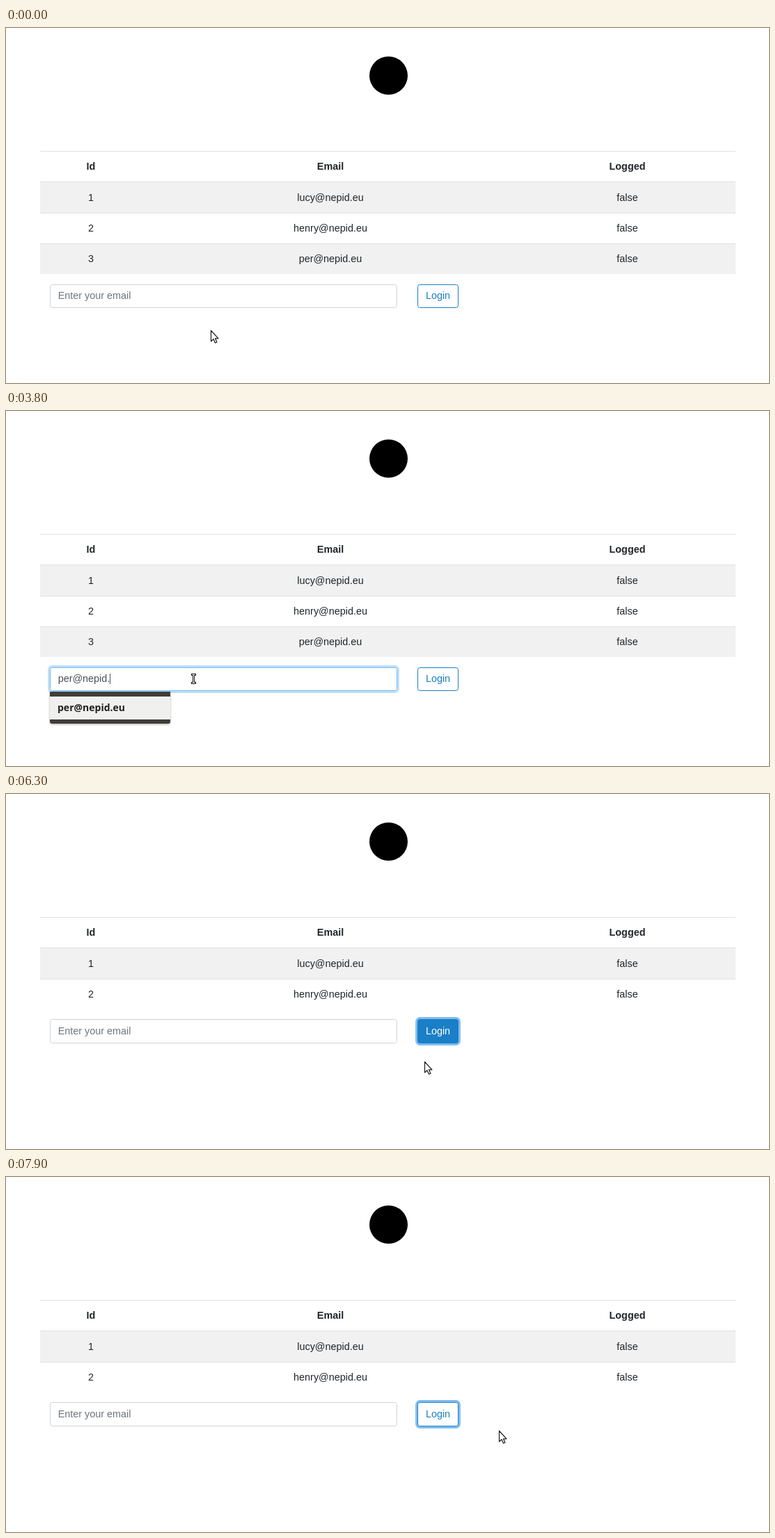
These frames come from a looping animation (1096 px wide and 511 px high, 8 s). An HTML page:

```html
<!DOCTYPE html>
<html lang="en">
<head>
<meta charset="utf-8">
<title>Login demo</title>
<style>
  html, body { margin: 0; width: 100%; height: 100%; overflow: hidden; background: #fff; }
  body { position: relative; font: 14.4px "Liberation Sans", Arial, sans-serif; color: #212529; }
  body * { box-sizing: border-box; }
  .logo, .row, .line, #form, #form > *, #list, #overlay { position: absolute; }
  .logo { left: 522px; top: 41px; width: 55px; height: 55px; border-radius: 50%; background: #000; }

  .row, .line { left: 49px; width: 999px; }
  .row {
    display: grid; grid-template-columns: 146px 542px 311px;
    height: 44px; line-height: 44px; text-align: center;
  }
  .line { height: 1px; background: #dee2e6; }
  .head { font-weight: bold; }

  #form { left: 0; }
  #input, #button {
    top: 0; height: 34.2px; padding: 5.4px 10.8px;
    border: 1px solid; border-radius: 3.6px; line-height: 20px; white-space: pre;
  }
  #input { left: 62.9px; width: 499.5px; }
  #button { left: 591.2px; width: 58.6px; padding: 5.4px 0; text-align: center; border-color: #1a7fc6; }
  #caret { top: 9.4px; width: 1px; height: 15px; background: #495057; }

  #list {
    left: 63px; top: 404px; width: 173px; padding: 7px 0 6px; border-radius: 0 0 3px 3px;
    background: #3f3e38; box-shadow: 0 1px 3px rgba(0, 0, 0, .35);
    font: 600 14px/31px "Noto Sans", "Open Sans", sans-serif; color: #222;
  }
  #list div { height: 33px; padding-left: 11px; }
  #overlay { left: 0; top: 0; width: 1096px; height: 511px; fill: none; }
</style>
</head>
<body>
<div class="logo"></div>
<div id="table"></div>

<div id="form">
  <div id="input"><span id="value"></span></div>
  <div id="caret"></div>
  <div id="button">Login</div>
</div>

<div id="list">
  <div id="otherOption">henry@nepid.eu</div>
  <div id="option">per@nepid.eu</div>
</div>

<svg id="overlay" viewBox="0 0 1096 511">
  <path id="wave" stroke="#e0574f" stroke-width=".9"/>
  <path id="arrow" d="M.5.5V16L4 12.7 6.4 18.3 8.900 17.2 6.5 11.8H11Z" fill="#fff" stroke="#1c1c1c" stroke-width="1.2" stroke-linejoin="round"/>
  <g id="beam" stroke-linecap="square">
    <path d="M-2-6H2M0-6V6M-2 6H2" stroke="#111" stroke-width="3"/>
    <path d="M-2-6H2M0-6V6M-2 6H2" stroke="#fff"/>
  </g>
</svg>
<script>
const LOOP = 8000, STEP = 100;
const EMAIL = "per@nepid.eu";
const TYPED_AT = [1700, 1800, 1900, 2500, 2900, 3000, 3200, 3300, 3500, 3800, 4000, 4300];
const FOCUS = 600, CLICK = 6200, REMOVED = 6300;
const ROW_HEIGHT = 44.2, FORM_TOP = 368.6;

// Pointer path: time, x, y
const PATH = [
  [200, 294, 435], [300, 291, 427], [400, 283, 408], [500, 274, 392], [600, 270, 387],
  [1000, 270, 387], [1100, 269, 385], [5200, 269, 385], [5300, 335, 388], [5500, 490, 397],
  [5600, 543, 398], [5800, 586, 402], [5900, 594, 396], [6100, 601, 385], [7100, 601, 385],
  [7200, 637, 368], [7300, 668, 325], [7400, 684, 288], [7500, 692, 268], [7600, 697, 285],
  [7700, 701, 315], [7800, 705, 345], [7900, 708, 365]
];

const $ = id => document.getElementById(id);
const show = (id, on) => { $(id).style.display = on ? "" : "none"; };
const style = (id, rules) => Object.assign($(id).style, rules);
const ramp = (t, from, to) => Math.max(0, Math.min(1, (t - from) / (to - from)));
const mix = (a, b, k) => `rgb(${a.map((v, i) => Math.round(v + (b[i] - v) * k))})`;

const WHITE = [255, 255, 255], BLUE = [26, 127, 198];

function buildTable() {
  const line = y => `<div class="line" style="top:${y}px"></div>`;
  const row = (y, values, attrs, fill) =>
    `<div ${attrs} style="top:${y}px;background:${fill}">` +
    values.map(v => `<span>${v}</span>`).join("") + "</div>";
  const users = ["lucy@nepid.eu", "henry@nepid.eu", EMAIL].map((email, i) =>
    row(222 + 44 * i, [i + 1, email, "false"], `class="row" id="row${i + 1}"`, i % 2 ? "#fff" : "#f1f1f1"));
  $("table").innerHTML = row(177, ["Id", "Email", "Logged"], 'class="row head"', "#fff") +
    users.join("") + [177, 221, 266].map(line).join("");
  $("row3").style.borderTop = "1px solid #dee2e6";
  $("row3").style.lineHeight = "42px";
}

function pointerAt(t) {
  const next = PATH.findIndex(p => p[0] >= t);
  if (next <= 0) return PATH[0].slice(1);
  const a = PATH[next - 1], b = PATH[next], k = ramp(t, a[0], b[0]);
  return [1, 2].map(i => Math.round(a[i] + (b[i] - a[i]) * k));
}

function drawPointer(t) {
  const [x, y] = pointerAt(t);
  const overInput = t < REMOVED && x > 63 && x < 563 && y > 369 && y < 403;
  show("beam", overInput);
  show("arrow", !overInput);
  $("arrow").setAttribute("transform", `translate(${x} ${y})`);
  $("beam").setAttribute("transform", `translate(${x + .5} ${y + .5})`);
  style("row2", { background: t >= REMOVED && y < 310 ? "#ececec" : "#fff" });
}

function drawInput(t) {
  const focused = t >= FOCUS && t < CLICK;
  const ring = focused ? ramp(t, FOCUS - 50, FOCUS + 150) : 0;
  const count = t < REMOVED ? TYPED_AT.filter(at => at <= t).length : 0;
  const value = $("value");
  const rightEdge = typed => {
    value.textContent = EMAIL.slice(0, typed);
    return 74.7 + value.getBoundingClientRect().width;
  };

  const misspelt = t >= 5300 && t < REMOVED;
  show("wave", misspelt);
  if (misspelt) $("wave").setAttribute("d", `M${rightEdge(4)} 392.5` + "l2-1.5 2 1.5".repeat(14));

  show("caret", focused && !(t >= 1400 && t < TYPED_AT[0]));
  style("caret", { left: Math.round(rightEdge(count)) + "px" });

  if (!count) value.textContent = "Enter your email";
  style("value", { color: count ? "#495057" : "#6c757d" });
  style("input", {
    borderColor: mix([206, 212, 218], [116, 185, 240], ring),
    boxShadow: ring ? `0 0 0 2.88px rgba(0, 123, 235, ${.25 * ring})` : "none"
  });
}

function drawButton(t) {
  const fill = t < CLICK ? ramp(t, 5800, 6000) : 1 - ramp(t, 6300, 6500);
  style("button", {
    background: mix(WHITE, BLUE, fill),
    color: mix(BLUE, WHITE, fill),
    boxShadow: t >= CLICK ? "0 0 0 2.88px #80bdf2" : "none"
  });
}

function drawList(t) {
  const closing = t < 5000 ? ramp(t, 4300, 4500) : 1;
  const opacity = t < 4400 ? ramp(t, FOCUS, FOCUS + 300) : t < 5000 ? 1 - .72 * closing : .1;
  const filtered = t >= 1800;
  show("list", t > FOCUS && t < 5100);
  show("otherOption", !filtered);
  style("option", { background: filtered ? "#f0f0ee" : "none" });
  style("list", { opacity, transform: `scale(${1 - .035 * closing}, ${1 - .025 * closing})` });
}

function draw(t) {
  show("row3", t < REMOVED);
  style("form", { top: FORM_TOP - (t < REMOVED ? 0 : ROW_HEIGHT) + "px" });
  drawInput(t);
  drawButton(t);
  drawList(t);
  drawPointer(t);
}

function tick() {
  draw(Math.floor(performance.now() % LOOP / STEP) * STEP);
  requestAnimationFrame(tick);
}

buildTable();
tick();
</script>
</body>
</html>
```
